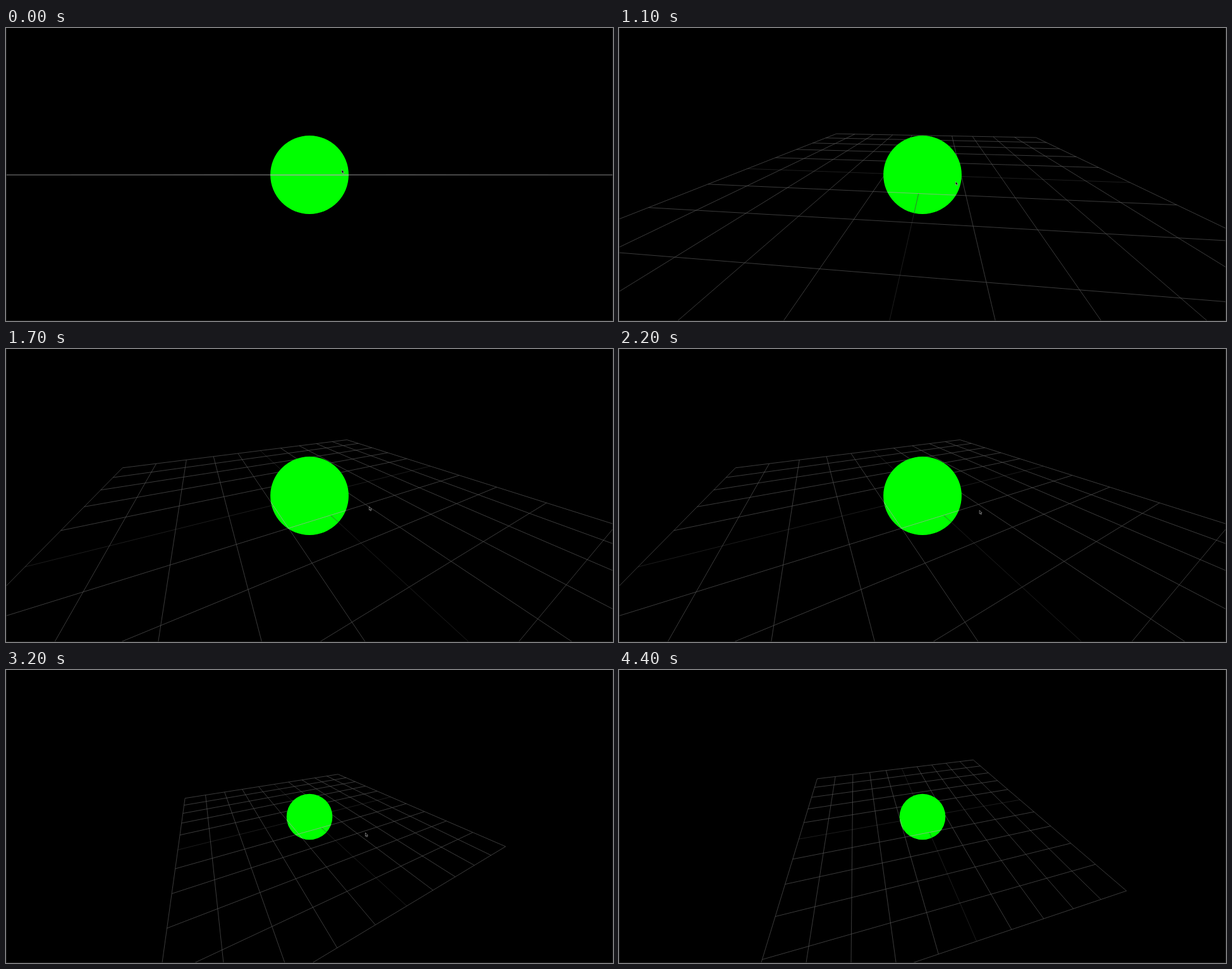
Write an HTML page with a canvas that moves like this. It is 960 px wide and 463 px high and loops after 5.23 s.

```html
<!DOCTYPE html>
<html lang="en">
<head>
<meta charset="utf-8">
<title>Orbiting a sphere on a grid</title>
<style>
html, body { margin: 0; width: 100%; height: 100%; overflow: hidden; background: #000; }
canvas { display: block; }
</style>
</head>
<body>
<canvas id="stage" width="960" height="463"></canvas>
<script>
const ctx = document.getElementById('stage').getContext('2d');
const W = 960, H = 463, LOOP = 5230, STEP = 100, EXIT = 4400;
const CX = W / 2, CY = 232;
const RAD = Math.PI / 180;
const FOCAL = H / 2 / Math.tan(37.5 * RAD);
const HALF = 5, NEAR = 0.1;
const ARROW = new Path2D('M0 0V5.5L1.3 4.4L2.2 6.6L3.2 6.2L2.3 4.1H4Z');

const axes = [], lines = [];
for (let i = -HALF; i <= HALF; i++) {
  if (i) lines.push([i, -HALF, i, HALF], [-HALF, i, HALF, i]);
}
// The part of each axis inside the unit sphere is never seen.
for (const s of [-1, 1]) axes.push([0, s, 0, s * HALF], [s, 0, s * HALF, 0]);

const ramp = (t, from, to) => Math.min(1, Math.max(0, (t - from) / (to - from)));
const ease = (t, from, to) => {
  const u = ramp(t, from, to);
  return u * u * (3 - 2 * u);
};

// Two drags turn the camera; the wheel moves it away in between.
function cameraAt(t) {
  const press = ramp(t, 400, 600), pull = ramp(t, 600, 1100);
  const sweep = ease(t, 1100, 1700);
  return {
    azimuth: 4.6 * press + 0.6 * pull - 32.7 * sweep + 12 * ramp(t, 3400, 3700),
    elevation: 12.8 * press + 10.6 * pull + 5.1 * ramp(t, 1100, 1500) + 11.3 * ease(t, 3500, 4000),
    dist: 5 + 0.44 * ramp(t, 2400, 2700) + 3 * ease(t, 2700, 3200)
  };
}

// A drag over the stage height is a full turn, so the pointer follows the angles.
function pointerAt(t, { azimuth, elevation }) {
  const wait = 1 - ramp(t, 0, 300), drift = ramp(t, 1700, 2400), leave = ramp(t, 4000, EXIT);
  return [
    539 - azimuth * H / 360 - 8 * wait - 6 * drift + 162 * leave,
    212.5 + elevation * H / 360 + 11.5 * wait + 8 * drift - 252 * leave
  ];
}

function drawLines(list, color, toView, maxDepth) {
  ctx.beginPath();
  for (const [x1, z1, x2, z2] of list) {
    const p = toView(x1, z1), q = toView(x2, z2);
    const delta = q.map((v, i) => v - p[i]);
    let u0 = 0, u1 = 1;
    const clip = (room, slope) => {
      if (Math.abs(slope) < 1e-9) { if (room < 0) u1 = -1; }
      else if (slope > 0) u0 = Math.max(u0, -room / slope);
      else u1 = Math.min(u1, -room / slope);
    };
    clip(p[2] - NEAR, delta[2]);
    clip(maxDepth - p[2], -delta[2]);
    if (u0 >= u1) continue;
    const [a, b] = [u0, u1].map(u => {
      const [x, y, depth] = p.map((v, i) => v + delta[i] * u);
      return [CX + 0.5 + FOCAL * x / depth, CY + 0.35 + FOCAL * y / depth];
    });
    ctx.moveTo(...a);
    ctx.lineTo(...b);
  }
  ctx.strokeStyle = color;
  ctx.lineWidth = 0.7;
  ctx.stroke();
}

function drawPointer(x, y) {
  ctx.save();
  ctx.translate(x, y);
  ctx.fillStyle = '#000';
  ctx.fill(ARROW);
  ctx.strokeStyle = '#bbb';
  ctx.lineWidth = 0.6;
  ctx.stroke(ARROW);
  ctx.restore();
}

function draw(t) {
  const camera = cameraAt(t), { azimuth, elevation, dist } = camera;
  const sa = Math.sin(azimuth * RAD), ca = Math.cos(azimuth * RAD);
  const se = Math.sin(elevation * RAD), ce = Math.cos(elevation * RAD);
  const toView = (x, z) => {
    const near = x * sa + z * ca;
    return [x * ca - z * sa, near * se, dist - near * ce];
  };
  const drawGrid = (axisColor, lineColor, maxDepth) => {
    drawLines(axes, axisColor, toView, maxDepth);
    drawLines(lines, lineColor, toView, maxDepth);
  };

  ctx.fillStyle = '#000';
  ctx.fillRect(0, 0, W, H);
  drawGrid('#2a2a2a', '#555', Infinity);
  ctx.fillStyle = '#0f0';
  ctx.beginPath();
  ctx.arc(CX, CY, FOCAL / Math.sqrt(dist * dist - 1) + 0.3, 0, 2 * Math.PI);
  ctx.fill();

  // Redraw only what lies in front of the sphere's outline.
  ctx.save();
  ctx.clip();
  drawGrid('#444', '#aaa', dist - 1 / dist);
  ctx.restore();

  ctx.strokeStyle = '#1a1a1a';
  ctx.lineWidth = 1;
  ctx.strokeRect(0.5, -1, W - 1, H + 0.5);
  if (t < EXIT) drawPointer(...pointerAt(t, camera));
}

function frame() {
  const t = performance.now() % LOOP;
  draw(Math.floor(t / STEP) * STEP);
  requestAnimationFrame(frame);
}
frame();
</script>
</body>
</html>
```
